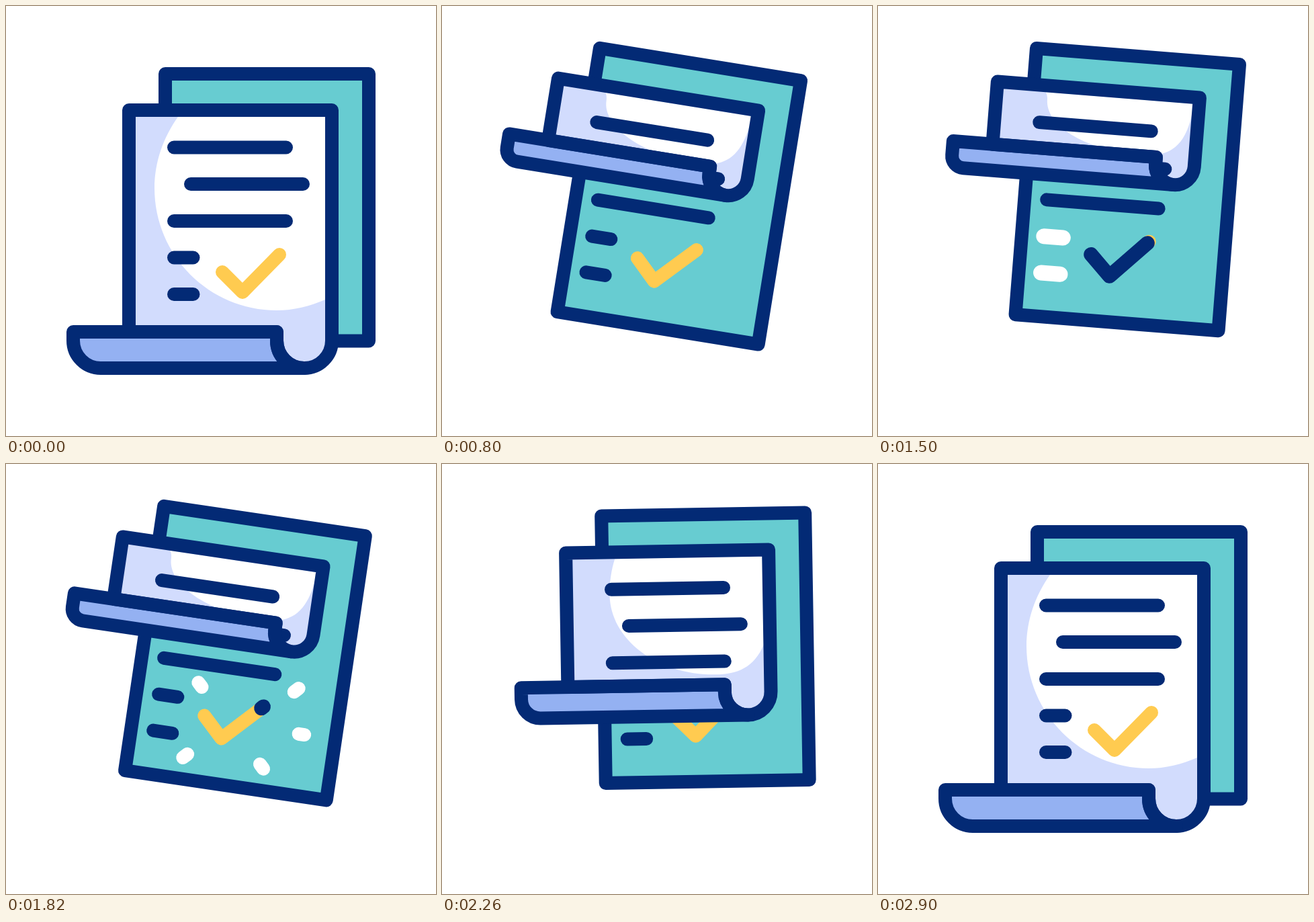
Recreate the animation shown at these times as an HTML page with a canvas. Size 640 by 640 pixels, loop 3040 ms.

```html
<!DOCTYPE html>
<html lang="en">
<head>
<meta charset="utf-8">
<title>Document scroll</title>
<style>
  html, body { margin: 0; width: 100%; height: 100%; overflow: hidden; background: #fff; }
  canvas { display: block; width: 640px; height: 640px; }
</style>
</head>
<body>
<canvas id="stage" width="640" height="640"></canvas>
<script>
const ctx = document.getElementById('stage').getContext('2d');
const LOOP = 3040;
const NAVY = '#032a75', TEAL = '#67ccd1', PALE = '#d2dcfd', ROLL = '#94b1f2', YELLOW = '#ffcb50';
const PIVOT = { x: 237, y: 88 };

// Keyframes are [time, value] pairs, eased in and out between neighbours.
const ROTATION = [[200, 0], [930, 10], [1283, -1], [1717, 10], [2150, -1], [2900, 0]];
const LIFT = [[200, 0], [440, 24], [800, -38], [2000, -38], [2620, 0]];
const CURL = [[200, 0], [544, 1], [2000, 1], [2560, 0]];
const CHECK_HEAD = [[1160, 0], [1540, 1]];
const CHECK_TAIL = [[1500, 0], [1860, 1]];
const DASH_HEAD = [[1100, 0], [1460, 1]];
const DASH_TAIL = [[1500, 0], [1800, 1]];
const SPARK_HEAD = [[1540, 0], [1780, 1]];
const SPARK_TAIL = [[1640, 0], [1920, 1]];

const LINES = [[250, 210.5, 417], [275, 265, 442], [250, 320, 417]];
const DASHES = [[250, 374.5, 278.5], [250, 429, 278.5]];
const CHECK = [[322, 396], [352, 426], [407, 370]];
const D = Math.SQRT1_2;
// Outer tip and outward direction of each spark.
const SPARKS = [
  [326, 353, -D, -D], [475, 340, D, -D], [493.5, 407, 1, 0],
  [440.5, 466, D, D], [319.5, 467, -D, D]
];
const SPARK_LENGTH = 30;

function valueAt(keys, t) {
  if (t <= keys[0][0]) return keys[0][1];
  for (let i = 1; i < keys.length; i++) {
    const [t0, a] = keys[i - 1], [t1, b] = keys[i];
    if (t < t1) {
      const x = (t - t0) / (t1 - t0);
      return a + (b - a) * x * x * (3 - 2 * x);
    }
  }
  return keys[keys.length - 1][1];
}

function strokePoints(points, color, width = 20) {
  ctx.beginPath();
  points.forEach(([x, y]) => ctx.lineTo(x, y));
  ctx.strokeStyle = color;
  ctx.lineWidth = width;
  ctx.stroke();
}

// Part of a polyline between two fractions of its length.
function trim(points, from, to) {
  const lengths = points.slice(1).map(([x, y], i) => Math.hypot(x - points[i][0], y - points[i][1]));
  const total = lengths.reduce((a, b) => a + b, 0);
  const start = from * total, end = to * total;
  const result = [];
  let done = 0;
  lengths.forEach((len, i) => {
    const a = Math.max(start, done), b = Math.min(end, done + len);
    if (b >= a) {
      for (const d of [a, b]) {
        const k = (d - done) / len;
        result.push([
          points[i][0] + (points[i + 1][0] - points[i][0]) * k,
          points[i][1] + (points[i + 1][1] - points[i][1]) * k
        ]);
      }
    }
    done += len;
  });
  return result;
}

function strokeTrimmed(points, head, tail, color, width) {
  if (head > 0 && tail < 1 && head > tail) strokePoints(trim(points, tail, head), color, width);
}

const level = ([x0, y, x1]) => [[x0, y], [x1, y]];

function drawText() {
  [...LINES, ...DASHES].forEach(l => strokePoints(level(l), NAVY));
  strokePoints(CHECK, YELLOW);
}

function drawBackSheet(t) {
  ctx.beginPath();
  ctx.rect(237, 101, 303, 397.5);
  ctx.fillStyle = TEAL;
  ctx.fill();
  ctx.strokeStyle = NAVY;
  ctx.lineWidth = 20;
  ctx.stroke();

  ctx.save();
  ctx.translate(20, 4.5);
  drawText();
  const dashHead = valueAt(DASH_HEAD, t), dashTail = valueAt(DASH_TAIL, t);
  DASHES.forEach(d => strokeTrimmed(level(d), dashHead, dashTail, '#fff', 23));
  strokeTrimmed(CHECK, valueAt(CHECK_HEAD, t), valueAt(CHECK_TAIL, t), NAVY, 21.5);
  ctx.restore();

  const head = valueAt(SPARK_HEAD, t), tail = valueAt(SPARK_TAIL, t);
  SPARKS.forEach(([x, y, dx, dy]) => {
    const inner = [x - dx * SPARK_LENGTH, y - dy * SPARK_LENGTH];
    strokeTrimmed([inner, [x, y]], head, tail, '#fff', 20);
  });
}

function fillGlow(u) {
  const left = 221 + 60 * u - 22 * u * u, midY = 271 - 95 * u;
  const bottom = 453 - 206 * u, right = 437 - 254 * u;
  ctx.beginPath();
  ctx.moveTo(475, 165);
  ctx.lineTo(256, 165);
  ctx.bezierCurveTo(256 - (256 - left) * 0.63, 165 + (midY - 165) * 0.29,
    left, midY - (midY - 165) * 0.36, left, midY);
  ctx.bezierCurveTo(left, midY + (bottom - midY) * 0.552,
    403 - (403 - left) * 0.552, bottom, 403, bottom);
  ctx.bezierCurveTo(428 + 14 * u, bottom, 452 + 15 * u, right + 10 + 42 * u, 475, right);
  ctx.lineTo(486, right);
  ctx.lineTo(486, 165);
  ctx.fillStyle = '#fff';
  ctx.fill();
}

function drawFrontSheet(u) {
  const top = 485 - 236.5 * u;
  const r = 41 - 12.1 * u;
  const cornerR = 41 - 23 * u;
  const foldY = top + 13 - 3 * u;
  const foldX = 485 - 2 * r, centerX = 485 - r;
  const bottom = foldY + r, rollX = foldX - 303;

  const roll = new Path2D();
  roll.moveTo(centerX, bottom);
  roll.lineTo(rollX + cornerR, bottom);
  roll.arc(rollX + cornerR, bottom - cornerR, cornerR, Math.PI / 2, Math.PI);
  roll.lineTo(rollX, top);
  roll.lineTo(foldX, top);
  roll.lineTo(foldX, foldY);
  roll.arc(centerX, foldY, r, Math.PI, Math.PI / 2, true);
  roll.closePath();

  const paper = new Path2D();
  paper.moveTo(183, top);
  paper.lineTo(183, 155);
  paper.lineTo(485, 155);
  paper.lineTo(485, foldY);
  paper.arc(centerX, foldY, r, 0, Math.PI);
  paper.lineTo(foldX, top);
  paper.closePath();

  ctx.fillStyle = PALE;
  ctx.fill(paper);
  ctx.save();
  ctx.clip(paper);
  fillGlow(u);
  drawText();
  ctx.restore();

  ctx.fillStyle = ROLL;
  ctx.fill(roll);
  ctx.strokeStyle = NAVY;
  ctx.lineWidth = 20;
  ctx.stroke(paper);
  ctx.stroke(roll);
}

function draw(t) {
  ctx.fillStyle = '#fff';
  ctx.fillRect(0, 0, 640, 640);
  ctx.lineCap = ctx.lineJoin = 'round';
  ctx.save();
  ctx.translate(PIVOT.x, PIVOT.y + valueAt(LIFT, t));
  ctx.rotate(valueAt(ROTATION, t) * Math.PI / 180);
  ctx.translate(-PIVOT.x, -PIVOT.y);
  drawBackSheet(t);
  drawFrontSheet(valueAt(CURL, t));
  ctx.restore();
}

const began = performance.now();
function tick() {
  draw((performance.now() - began) % LOOP);
  requestAnimationFrame(tick);
}
tick();
</script>
</body>
</html>
```
